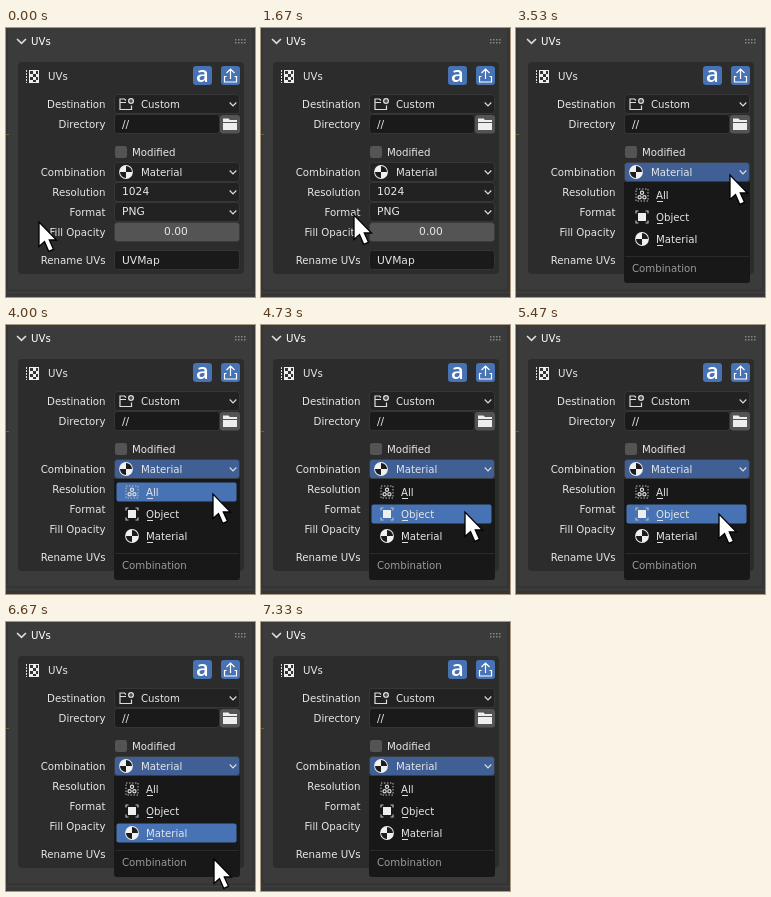
Animation of 249x269 px, one loop 8.07 s. Source, as an HTML page:

```html
<!DOCTYPE html>
<html lang="en">
<head>
<meta charset="utf-8">
<title>UVs panel</title>
<style>
html, body { margin: 0; width: 100%; height: 100%; overflow: hidden; background: #363636; }
svg { display: block; width: 249px; height: 269px; }
text { font: 10.2px "DejaVu Sans", sans-serif; fill: #e6e6e6; }
.num { font-size: 10.7px; }
.end { text-anchor: end; }
.mid { text-anchor: middle; }
.line { fill: none; stroke: #ddd; stroke-width: 1.2; }
.field { fill: #222; stroke: #3a3a3a; stroke-width: .8; }
.field.text { fill: #1a1a1a; }
.field.slide { fill: #545454; }
.field.hover { fill: #383838; }
.field.slide.hover { fill: #656565; }
.field.open { fill: #3f5f95; }
</style>
</head>
<body>
<svg id="stage" viewBox="0 0 249 269">
  <defs>
    <g id="chevron"><path class="line" d="M-3.3-1.5 0 1.8 3.3-1.5"/></g>
    <g id="ball">
      <circle r="6.9" fill="#f0f0f0"/>
      <path d="M0-6A6 6 0 0 1 6 0H0ZM0 0V6A6 6 0 0 1-6 0Z" fill="#1c1c1c"/>
    </g>
    <g id="cube">
      <path class="line" d="M-6-3.5V-6H-3.5M3.5-6H6V-3.5M6 3.5V6H3.5M-3.5 6H-6V3.5" style="stroke:#bbb"/>
      <rect x="-4" y="-4" width="8" height="8" fill="#eee"/>
    </g>
    <g id="group">
      <rect class="line" x="-6" y="-6" width="12" height="12" stroke-dasharray="1.5 1.5" style="stroke:#bbb;stroke-width:1"/>
      <circle class="line" cy="-2.2" r="1.6"/>
      <circle class="line" cx="-2.4" cy="2.2" r="1.6"/>
      <circle class="line" cx="2.4" cy="2.2" r="1.6"/>
    </g>
  </defs>

  <rect width="249" height="269" fill="#363636"/>
  <rect x="2" width="244" height="261" rx="3" fill="#3b3b3b"/>
  <rect y="106" width="3" height="1" fill="#66662c"/>
  <path d="M0 264.5H249" stroke="#404040"/>
  <use href="#chevron" transform="translate(15.5 13) scale(1.35)"/>
  <text x="25" y="17" style="fill:#fff">UVs</text>
  <g id="grip" fill="#888"></g>
  <rect x="12" y="34" width="226" height="212" rx="4" fill="#2c2c2c"/>

  <path d="M20.5 42V55" stroke="#ddd" stroke-dasharray="2 1"/>
  <rect x="23.5" y="42.5" width="9" height="12" fill="#eee" stroke="#eee"/>
  <path d="M24 43h3v3h-3zM27 46h3v3h-3zM24 49h3v3h-3zM30 43h2v3h-2zM30 49h2v3h-2zM27 52h3v2h-3z" fill="#333"/>
  <text x="42" y="52">UVs</text>
  <rect x="187" y="38" width="19" height="19" rx="3" fill="#4772b3"/>
  <text x="196.5" y="54" class="mid" style="font:600 22px 'Open Sans',sans-serif;fill:#fff">a</text>
  <rect x="215" y="38" width="19" height="19" rx="3" fill="#4772b3"/>
  <path class="line" d="M224.5 51V41M220.5 45 224.5 41 228.5 45M220.5 48.5H218.5V54H230.5V48.5H228.5" style="stroke:#fff"/>

  <g id="fields"></g>
  <g id="labels"></g>

  <path class="line" d="M120 72.5 118.5 71H114V81.5H125.5V77.5M114 74.5H120"/>
  <circle cx="125" cy="73" r="3" fill="#ddd"/>
  <path d="M123 73H127M125 71V75" stroke="#222"/>
  <text x="135" y="80">Custom</text>
  <use href="#chevron" x="227" y="76"/>
  <text x="116" y="100" class="num">//</text>
  <rect x="214" y="87" width="20" height="18.5" rx="3" fill="#545454"/>
  <path d="M217 90.5H222.5L224 92H231V94H217ZM217 95H231V102H217Z" fill="#eee"/>
  <rect x="109" y="118" width="12" height="12" rx="2.5" fill="#545454"/>
  <text x="126" y="128">Modified</text>
  <use href="#ball" x="120" y="144"/>
  <text x="135" y="148">Material</text>
  <use href="#chevron" x="227" y="144"/>
  <text x="116" y="167" class="num">1024</text>
  <use href="#chevron" x="227" y="164"/>
  <text x="116" y="187" class="num">PNG</text>
  <use href="#chevron" x="227" y="184"/>
  <text x="170" y="207" class="num mid">0.00</text>
  <text x="116" y="236" class="num">UVMap</text>

  <g id="menu">
    <path d="M108 154H234V252a3 3 0 0 1-3 3H111a3 3 0 0 1-3-3Z" fill="#181818"/>
    <rect id="bar" x="110.5" width="120" height="19" rx="2" fill="#4772b3"/>
    <g id="items"></g>
    <path d="M109 228.5H233" stroke="#2b2b2b"/>
    <text x="116" y="244" style="fill:#9a9a9a">Combination</text>
  </g>

  <path id="cursor" d="M0 0V24.5L5.5 19.5 9.7 29.3 14.5 27.3 10.3 18H17.5Z" fill="#fff" stroke="#000" stroke-width="1.3"/>
</svg>
<script>
const LOOP = 8070, OPEN = 2730, LEAVE = 7270, GONE = 7330;

// start, end, steps, then the start, bend and end of the path
const MOVES = [
  [1670, 2400, 12, [93, 187], [175, 120], [214, 147]],
  [3530, 4000, 8, [214, 147], [211, 166], [207, 169]],
  [4530, 4930, 7, [207, 169], [203, 195], [203, 189]],
  [5470, 5870, 7, [203, 189], [201, 222], [199, 208]],
  [6400, 6800, 6, [199, 208], [200, 250], [222, 233]],
  [7270, 7330, 2, [235, 231], [240, 231], [249, 231]]
];
const REST = [33, 194];

const LABELS = [["Destination", 76], ["Directory", 96, "text"], ["Combination", 144], ["Resolution", 164],
  ["Format", 184], ["Fill Opacity", 204, "slide"], ["Rename UVs", 232, "text"]];
const ITEMS = [["All", "group"], ["Object", "cube"], ["Material", "ball"]];

const $ = id => document.getElementById(id);
const itemY = i => 167 + 22 * i;

$("labels").innerHTML = LABELS.map(([s, y]) =>
  `<text class="end" x="99.5" y="${y + 4}">${s}</text>`).join("");

$("fields").innerHTML = LABELS.map(([s, y, kind = ""]) => {
  const w = s === "Directory" ? 105 : 125;
  return `<rect class="field ${kind}" x="108.5" y="${y - 9.5}" width="${w}" height="19" rx="3"/>`;
}).join("");

$("items").innerHTML = ITEMS.map(([s, icon], i) => {
  const y = itemY(i);
  return `<use href="#${icon}" x="126" y="${y}"/><text x="140" y="${y + 4}">${s}</text>` +
    `<path d="M141 ${y + 6.5}H147" stroke="#ddd"/>`;
}).join("");

for (let i = 0; i < 8; i++)
  $("grip").innerHTML += `<rect x="${229 + i % 4 * 3}" y="${11 + (i >> 2) * 3}" width="1.5" height="1.5"/>`;

const fields = [...$("fields").children];

function cursorAt(t) {
  const move = MOVES.filter(m => m[0] <= t).pop();
  if (!move) return REST;
  const [start, end, steps, a, b, c] = move;
  const k = Math.floor((t - start) / (end - start) * (steps - 1) + 1e-3);
  const u = Math.min(1, k / (steps - 1)), v = 1 - u;
  return a.map((p, i) => Math.round(v * v * p + 2 * u * v * b[i] + u * u * c[i]));
}

function draw(t) {
  const [x, y] = cursorAt(t), open = t >= OPEN;
  $("cursor").setAttribute("transform", `translate(${x} ${y})`);
  $("cursor").style.display = t < GONE ? "" : "none";
  $("menu").style.display = open ? "" : "none";

  fields.forEach((f, i) => {
    const inside = x > 108 && x < 234 && Math.abs(y - LABELS[i][1]) < 10;
    f.classList.toggle("hover", !open && inside);
    f.classList.toggle("open", open && i === 2);
  });

  const row = Math.min(2, Math.floor((y - 156) / 22));
  $("bar").style.display = row >= 0 && t < LEAVE ? "" : "none";
  $("bar").setAttribute("y", itemY(row) - 9.5);
}

function tick() {
  draw(performance.now() % LOOP);
  requestAnimationFrame(tick);
}
tick();
</script>
</body>
</html>
```
